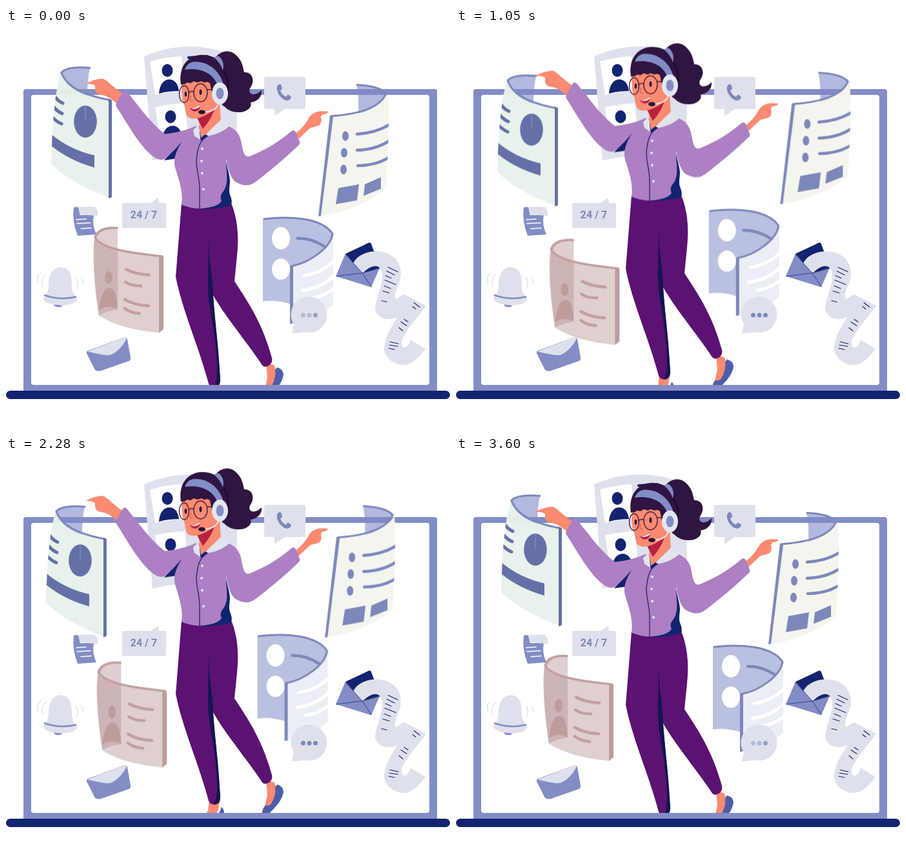
An HTML page that plays this animation: 688 by 622 pixels, repeating every 3.63 s.

```html
<!DOCTYPE html>
<html lang="en">
<head>
<meta charset="utf-8">
<title>Support agent</title>
<style>
  html, body { margin: 0; width: 100%; height: 100%; overflow: hidden; background: #fff; }
  svg { display: block; width: 688px; height: 622px; }
  .float {
    animation: float 1815ms cubic-bezier(.364, 0, .636, 1) infinite alternate;
  }
  .fast { animation-duration: 907.5ms; }
  @keyframes float { to { transform: translate(var(--x), var(--y)); } }

  .blue { fill: #838dc5; }
  .slate { fill: #7d88ba; }
  .deep { fill: #6570a8; }
  .navy { fill: #12236f; }
  .grey { fill: #dee1ec; }
  .curl { fill: #7f89c8; fill-opacity: .6; }
  .skin { fill: #fa8a70; }
  .hair { fill: #301441; }
  .shirt { fill: #ac80c3; }
  .pants { fill: #5b1273; }
  .white { fill: #fff; }
  .line { fill: none; stroke-linecap: round; stroke-linejoin: round; }
  .s-slate { stroke: #7d88ba; }
  .s-deep { stroke: #6570a8; }
  .s-navy { stroke: #12236f; }
  .s-pink { stroke: #c2a09e; }

  .dot { fill: #7d88ba; animation: 3630ms linear infinite; }
  .d1 { animation-name: d1; }
  .d2 { animation-name: d2; }
  .d3 { animation-name: d3; }
  @keyframes d1 { 0%, 23% { fill: #b3bad4; } 27%, 92% { fill: #7d88ba; } 96%, 100% { fill: #b3bad4; } }
  @keyframes d2 { 0%, 11% { fill: #b3bad4; } 15%, 92% { fill: #7d88ba; } 96%, 100% { fill: #b3bad4; } }
  @keyframes d3 { 0% { fill: #98a2c7; } 3%, 92% { fill: #7d88ba; } 96%, 100% { fill: #98a2c7; } }
</style>
</head>
<body>
<svg viewBox="0 0 688 622">
  <defs>
    <clipPath id="floor"><rect width="688" height="555"/></clipPath>
    <clipPath id="page1"><path d="M85 70C75 100 72 150 70 211Q100 242 163 265V112C130 106 98 95 85 70Z"/></clipPath>
    <clipPath id="page2"><path d="M503 137C545 136 580 125 592 103Q595 170 588 250Q550 282 486 293Z"/></clipPath>
    <clipPath id="page4"><path d="M443 369C470 365 505 342 507 320V430Q480 455 443 460Z"/></clipPath>
  </defs>

  <!-- laptop -->
  <path class="blue" fill-rule="evenodd" d="M31 95H664Q668 95 668 99V564H27V99Q27 95 31 95ZM43 104Q39 104 39 108V551Q39 555 43 555H652Q656 555 656 551V108Q656 104 652 104Z"/>
  <rect class="navy" y="564" width="688" height="13" rx="6.5"/>

  <!-- contact sheet -->
  <path class="grey" d="M214 44Q285 13 359 45L357 190Q290 193 227 206Z"/>
  <path class="white" d="M223 52Q248 45 272 44L276 98Q252 99 231 104ZM231 123Q255 118 277 117L282 164Q260 165 238 170Z"/>
  <g id="person" class="navy">
    <ellipse cx="250" cy="66" rx="8.5" ry="10"/>
    <path d="M237 102C238 87 245 80 253 80C262 80 267 88 268 98Q251 98 237 102Z"/>
  </g>
  <use href="#person" x="5" y="72"/>
  <path class="line s-navy" stroke-width="4" d="M283 46L312 44"/>

  <!-- green page -->
  <g class="float" style="--x:-9.6px;--y:20px">
    <path fill="#e8f2ec" fill-opacity=".96" d="M85 70C75 100 72 150 70 211Q100 242 163 265V112C130 106 98 95 85 70Z"/>
    <path class="curl" d="M85 69Q97 60 130 62Q126 80 126 105C105 98 92 88 85 69Z"/>
    <g clip-path="url(#page1)">
      <path class="line s-deep" stroke-width="5" d="M76 107Q81 114 88 117M74 123Q80 130 87 133M72 139Q79 146 86 149"/>
      <path class="deep" d="M70 165Q98 189 137 198V217Q98 206 70 183Z"/>
    </g>
    <ellipse class="deep" cx="123" cy="145.500" rx="17.800" ry="25"/>
    <path class="line" stroke="#a0a8cd" stroke-width=".7" d="M123 122V144"/>
    <path class="line s-slate" stroke-width="3" d="M130 62Q96 59 86 69C94 94 128 106 161 112"/>
    <path class="deep" d="M159 110L164 112V263L159 265Z"/>
  </g>

  <!-- cream page -->
  <g class="float fast" style="--x:19.500px;--y:-20px">
    <path fill="#f4f5ee" d="M503 137C545 136 580 125 592 103Q595 170 588 250Q550 282 486 293Z"/>
    <path class="curl" d="M543 88C565 88 583 94 590 102C582 120 560 130 546 133Q547 105 543 88Z"/>
    <path class="line s-slate" stroke-width="3" d="M544 88.500C565 89 583 94 589 102C580 124 545 134 504 137"/>
    <path class="slate" d="M502 136L507 138L488 292L484 293Z"/>
    <g class="slate">
      <ellipse cx="526" cy="168" rx="5" ry="7.500"/>
      <ellipse cx="524" cy="194" rx="5" ry="7.500"/>
      <ellipse cx="523" cy="220" rx="5" ry="7.500"/>
      <path d="M515 249L547 243L544 268L511 274ZM556 243L581 232V250L554 261Z"/>
    </g>
    <path class="line s-slate" clip-path="url(#page2)" stroke-width="4.500" d="M544 165Q575 163 596 149M544 190Q575 189 596 174M545 214Q573 214 594 201"/>
  </g>

  <!-- pink page -->
  <g class="float fast" style="--x:10px;--y:20px">
    <path fill="#dfcfcf" d="M137 328C150 346 205 352 243 355V470L237 474Q175 468 144 447C139 415 133 360 137 328Z"/>
    <path fill="#cdb4b4" d="M137 328C139 316 150 309 173 310V438Q155 440 144 447C139 415 133 360 137 328Z"/>
    <path fill="#dfcfcf" d="M140 329C143 316 152 313 173 312V345C155 342 145 338 140 329Z"/>
    <g fill="#bd9d9b">
      <ellipse cx="159" cy="388" rx="6" ry="10"/>
      <path d="M144 438C147 414 153 404 160 404C167 404 172 413 173 437Q157 430 144 438Z"/>
      <path d="M237 354L244 355V468L237 474Z"/>
    </g>
    <path class="line s-pink" stroke-width="4.500" d="M186 375Q200 383 222 384M185 395Q194 401 209 401M184 422Q199 431 221 432M184 436Q193 443 207 444"/>
    <path class="line s-pink" stroke-width="3.500" d="M172 311C150 309 140 317 138 326C150 346 205 351 241 355"/>
  </g>

  <!-- blue page -->
  <g class="float" style="--x:-10px;--y:-20px">
    <path fill="#bac0e0" d="M398 297C440 291 492 296 507 320C505 342 470 365 443 369V430Q420 422 398 425Z"/>
    <path fill="#eceef5" d="M443 369C470 365 505 342 507 320V430Q480 455 443 460Z"/>
    <ellipse class="white" cx="426" cy="327" rx="14" ry="17.500"/>
    <ellipse class="white" cx="426" cy="375" rx="14" ry="16.500"/>
    <path class="line s-slate" stroke-width="4.500" d="M452 327Q475 327 494 340"/>
    <path class="line" clip-path="url(#page4)" stroke="#fff" stroke-width="5" d="M462 385Q492 380 510 360M459 408Q490 404 510 383M473 420Q492 418 510 404"/>
    <path class="line s-slate" stroke-width="3" d="M400 297C440 292 490 295 506 320C503 342 470 365 443 370"/>
    <path class="slate" d="M440 370L445 368V459L440 460Z"/>
  </g>

  <!-- speech bubbles -->
  <path class="grey" d="M403 76H461Q464 76 464 79V123Q464 126 461 126H432L416 137V126H403Q400 126 400 123V79Q400 76 403 76Z"/>
  <path class="slate" d="M422 88Q426 86 427 90L428 94Q428 96 425 97Q427 104 434 107Q436 103 438 104L441 106Q443 108 440 111C434 116 425 109 421 100Q418 92 422 88Z"/>
  <path class="grey" d="M183 272H224L236 264L237 272H245Q248 272 248 275V308Q248 311 245 311H183Q180 311 180 308V275Q180 272 183 272Z"/>
  <text class="slate" x="213.500" y="296" text-anchor="middle" font-family="Roboto, sans-serif" font-weight="700" font-size="16">24 / 7</text>
  <path class="grey" d="M446 461A28 28 0 1 1 463 473L443 475Z"/>
  <circle class="dot d1" cx="460.500" cy="446.500" r="3.500"/>
  <circle class="dot d2" cx="470" cy="446.500" r="3.500"/>
  <circle class="dot d3" cx="479.500" cy="446.500" r="3.500"/>

  <!-- note -->
  <path class="blue" d="M105 279Q102 300 111 323L140 321Q133 306 136 291H115L112 278Z"/>
  <path class="grey" d="M110 278H137Q143 281 142 292L114 290Q116 281 110 278Z"/>
  <path class="line" stroke="#fff" stroke-width="1.300" d="M109 298L124 297M110 304L131 303M116 312L132 311"/>

  <!-- bell -->
  <path class="blue" d="M74 428L88 429Q88 434 81 434Q74 434 74 428Z"/>
  <path class="grey" d="M58 419Q66 413 66 400C66 382 73 372 85 372C98 372 102 383 102 400Q102 413 109 418Q112 426 102 429Q84 434 66 428Q58 425 58 419Z"/>
  <path class="line" stroke="#838dc5" stroke-width="2.500" d="M60 415.500Q83 424 108 418"/>
  <path class="line" stroke="#dee1ec" stroke-width="1.300" d="M62 383Q53 390 57 402M54 381Q46 386 50 396M108 388Q114 395 109 405M116 388Q122 393 118 399"/>

  <!-- small envelope -->
  <path class="blue" d="M125 506Q124 502 129 501L183 481Q187 480 188 484L193 512Q194 516 190 518L147 533Q140 535 137 530Z"/>
  <path class="grey" d="M126 503L183 481Q187 480 187 483Q178 501 163 508Q158 511 126 503Z"/>

  <!-- envelope with long receipt -->
  <path class="navy" d="M526 351L562 334Q565 333 566 336L580 374L552 382Z"/>
  <path class="grey" d="M538 366C545 350 570 343 590 350C608 357 614 372 611 390C607 405 600 414 604 422L617 414L651 432C637 452 614 475 613 490C613 500 622 500 627 485L650 499C640 512 630 524 615 524C600 523 586 512 586 498C588 475 600 462 606 450C590 456 575 452 572 437C574 415 587 395 582 378C577 364 562 371 552 382Z"/>
  <path class="line s-navy" stroke-width="1.100" d="M592 372L607 379M590 378L602 384M588 385L597 389M587 392L604 399M586 401L596 405M584 409L594 412M582 424L590 426M632 427L641 434M630 433L635 437M617 453L623 457M612 457L621 463M609 466L615 471M595 488L608 491M594 493L607 495M593 498L602 500"/>
  <path class="blue" d="M511 386L526 351L552 381L579 373L566 403Z"/>
  <path class="line s-navy" stroke-width=".7" d="M526 352L552 381L512 386M552 381L566 402M552 381L578 374"/>

  <!-- agent -->
  <g clip-path="url(#floor)">
  <g class="float" style="--x:0px;--y:-20px">
  <g transform="translate(0 18.800)">
    <!-- feet -->
    <path class="skin" d="M315 534L331 536L329 547L325 557H307L313 550Z"/>
    <path fill="#4e5daa" d="M334 544Q339 548 338 558H324Q332 554 334 544Z"/>
    <path class="skin" d="M403 501L416 506L420 520L410 543L401 543L405 525Z"/>
    <path fill="#4e5daa" d="M420 509Q429 511 430 520C428 534 418 543 409 553Q400 558 397 553Q397 547 402 541Q407 543 411 539Q419 524 417 513Z"/>

    <!-- trousers -->
    <path class="pants" d="M272 254L350 256C359 280 361 305 358 335L354 375C377 410 397 440 412 494C414 503 407 508 401 508Q397 507 394 501C368 463 340 430 321 397C324 440 328 470 332 530Q332 539 324 540Q315 541 313 531C300 480 273 420 263 368Z"/>
    <path fill="#121650" d="M314 306C314 345 321 370 321 397C324 440 329 470 332 526Q332 540 322 540Q328 530 327 505C325 450 313 420 313 375Z"/>

    <!-- far arm and hand -->
    <path class="skin" d="M448 146Q464 133 470 120C476 112 484 109 499 111Q500 114 490 116L488 119Q490 128 486 132C480 136 473 134 469 139L452 155Z"/>
    <path class="navy" d="M273 157L245 187L266 184ZM340 180C342 200 347 208 347 220C346 232 345 236 348 243Q351 251 349 257Q330 263 300 263L320 240Z"/>
    <path class="shirt" d="M345 134Q360 140 364 156C367 170 368 183 377 181C400 172 424 158 443 141Q447 139 449 143L455 158Q456 161 454 163C430 186 406 206 386 221Q372 231 355 220Q346 212 342 190Z"/>

    <!-- near hand, then torso and near arm -->
    <path class="skin" d="M125 67Q139 60 150 60C158 63 166 74 179 82L190 96L178 104C166 93 157 86 146 85Q139 84 138 77L138 71Q134 68 125 68Z"/>
    <path class="shirt" d="M293 134C275 142 262 144 246 146C224 129 206 103 188 81Q184 76 181 80L171 98Q169 101 172 105C190 133 210 170 231 183Q239 188 246 185Q262 171 273 157C262 175 259 186 262 198C268 217 275 237 272 256Q286 262 301 262C315 261 330 258 334 250Q330 242 337 235C346 222 341 205 341 188L356 150L346 134Z"/>
    <path class="line" stroke="#271f78" stroke-width="1.300" d="M312 149C300 157 297 166 295 187C295 204 300 213 300 232L300 262"/>
    <g fill="#e9e3f2">
      <circle cx="304" cy="169" r="2"/><circle cx="303" cy="188" r="2"/>
      <circle cx="304" cy="207" r="2"/><circle cx="306" cy="232" r="2"/>
    </g>
    <path class="navy" d="M299 141H318L313 149L302 157Z"/>

    <!-- ponytail and neck -->
    <path class="hair" d="M320 37C326 16 347 12 358 25C366 33 367 41 369 50C383 50 386 64 378 75C374 86 387 88 396 78Q397 88 388 94Q382 97 379 97C382 104 374 111 365 112Q348 114 338 103Z"/>
    <path class="skin" d="M298 112L331 94L333 128L307 148L302 152L300 139Z"/>
    <path fill="#b7213e" d="M296 121Q310 118 323 108Q317 125 305 138Z"/>
    <path fill="#e1e4ef" d="M298 132L290 140L292 149L301 155L300 141ZM333 124L347 133Q335 145 314 149L309 147Z"/>

    <!-- head -->
    <path class="hair" d="M271 69C267 42 281 23 305 23C333 24 346 46 346 78Q346 99 337 103L314 75Z"/>
    <path class="skin" d="M273 65Q295 58 319 64L326 94C326 109 307 121 293 122Q283 123 280 117C277 109 278 103 274 95Q271 78 273 65Z"/>
    <path class="hair" d="M271 69C271 55 277 44 288 43C304 43 322 56 324 76L319 82L316 67L312 65L307 66L302 64L297 66L291 64L286 67L281 66L276 69Z"/>
    <path class="blue" d="M277 46Q281 35 290 34C312 32 331 47 337 69L328 71C322 52 302 42 277 46ZM322 27Q329 23 332 27Q339 35 336 47Q333 36 322 27Z"/>
    <path class="line" stroke="#1c0a2d" stroke-width="2" d="M337 48Q346 62 344 78"/>
    <ellipse cx="331.500" cy="83" rx="12.500" ry="17" fill="#e4e7f1"/>
    <ellipse class="blue" cx="331.500" cy="83" rx="6" ry="9"/>
    <path class="line" stroke="#f3f1f5" stroke-width="1.800" d="M329 99Q325 111 307 112"/>

    <!-- face -->
    <g class="line" stroke="#4a1b3c" stroke-width="1.400">
      <ellipse cx="276" cy="84" rx="7.500" ry="13"/>
      <ellipse cx="301.500" cy="82" rx="10.500" ry="14"/>
      <path d="M283 82Q287 78 291 81M312 77L320 77"/>
    </g>
    <path class="line" stroke="#d9614f" stroke-width="1.200" d="M287 87Q282 94 289 95"/>
    <ellipse fill="#2a1240" cx="278.500" cy="84" rx="1.800" ry="4"/>
    <ellipse fill="#2a1240" cx="301.500" cy="81" rx="1.900" ry="4.200"/>
    <path fill="#b7213e" d="M285 106Q295 106 301 99Q302 110 293 111Q288 111 285 106Z"/>
    <path class="white" d="M286 106Q295 106 301 100L300 104Q293 109 286 106Z"/>
    <ellipse fill="#26103c" cx="303.500" cy="112" rx="5.500" ry="3.200"/>
  </g>
  </g>
  </g>
</svg>
</body>
</html>
```
